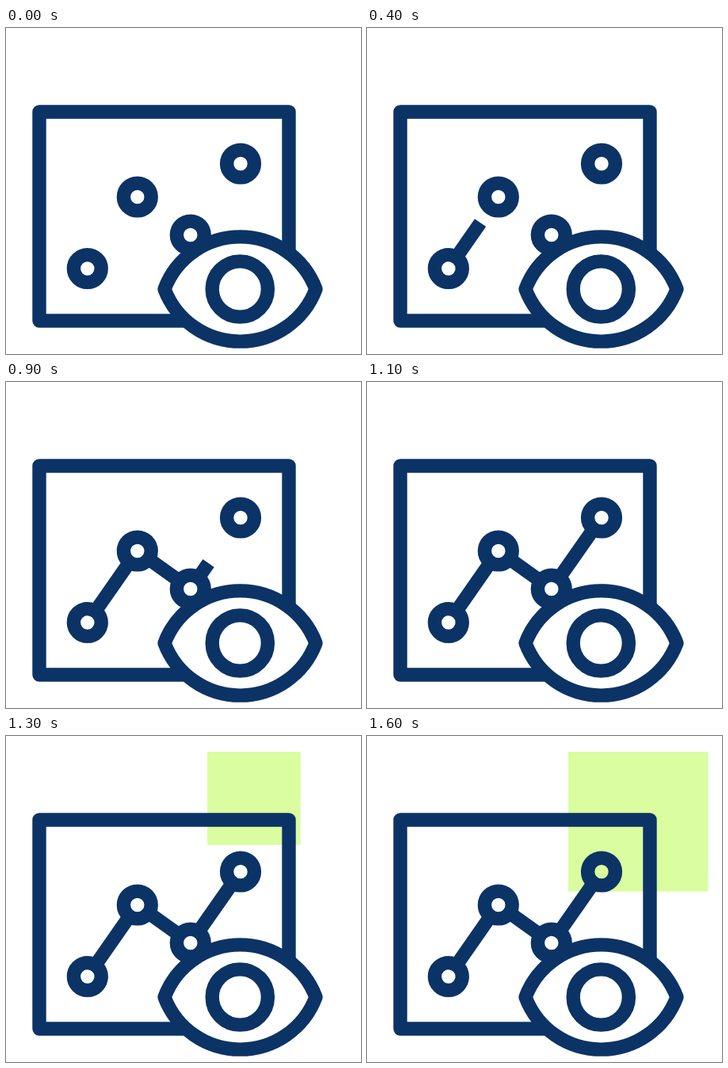
These frames come from a looping animation (448x412 px, 1800 ms). An HTML page:

```html
<!DOCTYPE html>
<html lang="en">
<head>
<meta charset="utf-8">
<title>Chart and eye</title>
<style>
  html, body { margin: 0; width: 100%; height: 100%; overflow: hidden; background: #fff; }
  svg { display: block; width: 100vw; height: 100vh; }
</style>
</head>
<body>
<svg viewBox="0 0 448 412">
  <rect id="square" x="254" y="20" fill="#d9fd9f"/>
  <g fill="none" stroke="#0b3365" stroke-width="17.4" stroke-linejoin="round">
    <rect x="42" y="106" width="315" height="264"/>
    <g id="chart"></g>
    <path d="M200 330A102 102 0 0 1 391 330A102 102 0 0 1 200 330Z" fill="#fff"/>
    <circle cx="295.3" cy="330" r="35.1"/>
  </g>
</svg>
<script>
const LOOP = 1800, STEP = 100, SEGMENT = 300, GAP = 9, SIDE = 176.5;
const points = [[102.8, 304], [165.8, 213.5], [232.8, 261.5], [296, 171.5]];
const chart = document.getElementById('chart');
const square = document.getElementById('square');

function add(name, attrs) {
  const el = document.createElementNS('http://www.w3.org/2000/svg', name);
  for (const key in attrs) el.setAttribute(key, attrs[key]);
  return chart.appendChild(el);
}

const line = add('path', {});
for (const [cx, cy] of points) add('circle', { cx, cy, r: 17.4 });

const clamp = v => Math.max(0, Math.min(1, v));

// Part of the way from one dot's hole to the next
function segment([x1, y1], [x2, y2], p) {
  const length = Math.hypot(x2 - x1, y2 - y1);
  const at = d => `${x1 + (x2 - x1) * d / length} ${y1 + (y2 - y1) * d / length}`;
  return `M${at(GAP)}L${at(GAP + (length - 2 * GAP) * p)}`;
}

function draw(time) {
  // Motion advances in whole steps
  const t = Math.floor(time % LOOP / STEP) * STEP;
  const progress = i => clamp((t - 200 - i * SEGMENT) / SEGMENT);
  let d = '';
  for (let i = 0; i < points.length - 1; i++) {
    const p = progress(i);
    if (p > 0) d += segment(points[i], points[i + 1], p);
  }
  line.setAttribute('d', d);
  const size = SIDE * progress(3);
  square.setAttribute('width', size);
  square.setAttribute('height', size);
}

let start;
function tick(now) {
  start ??= now;
  draw(now - start);
  requestAnimationFrame(tick);
}
draw(0);
requestAnimationFrame(tick);
</script>
</body>
</html>
```
